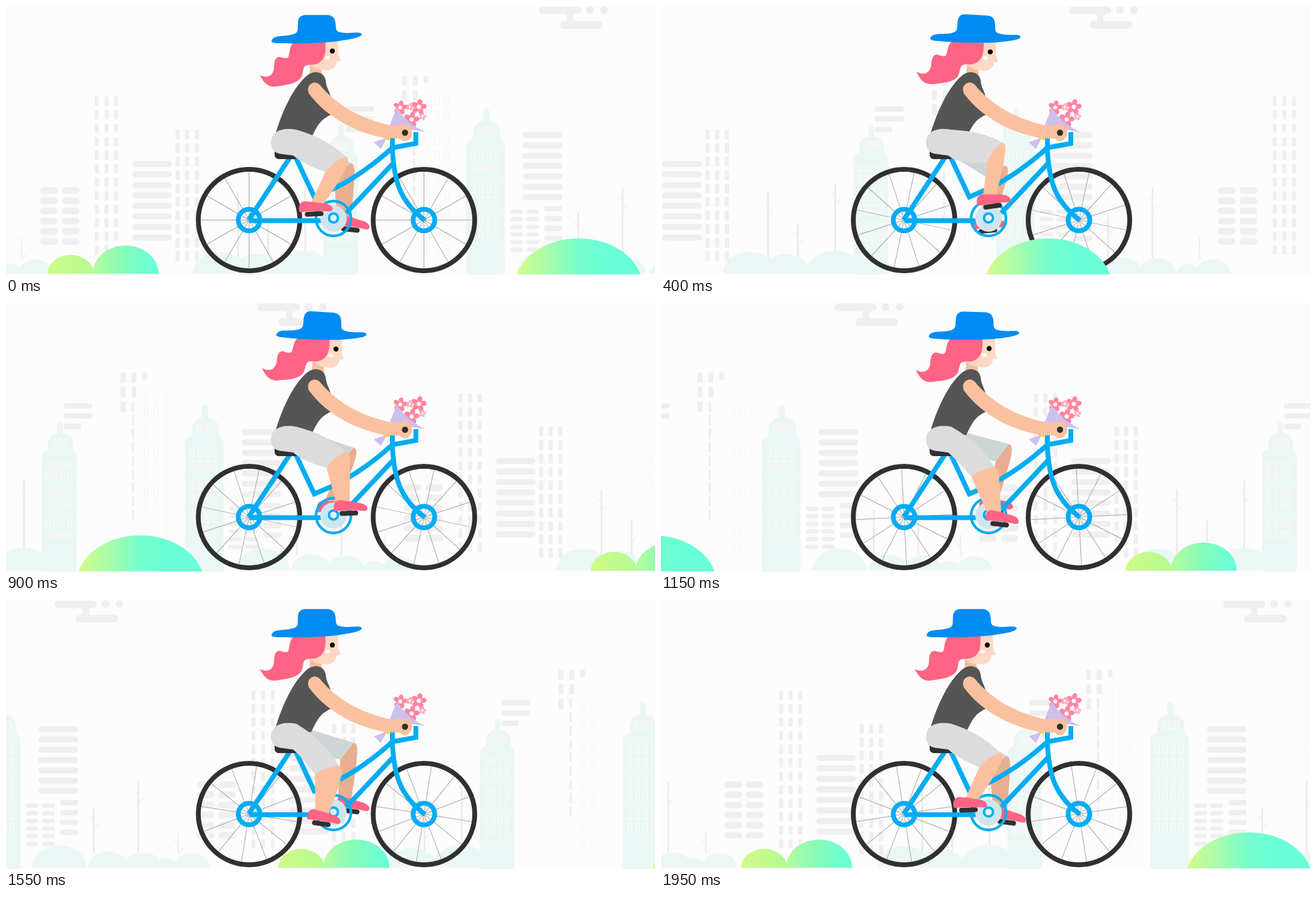
Write an HTML page with a canvas that moves like this. It is 1080x448 px and loops after 2 s.

```html
<!DOCTYPE html>
<html lang="en">
<head>
<meta charset="utf-8">
<title>Bicycle ride</title>
<style>
  html, body { margin: 0; width: 100%; height: 100%; overflow: hidden; background: #fcfcfc; }
  canvas { display: block; width: 1080px; height: 448px; }
</style>
</head>
<body>
<canvas id="stage" width="1080" height="448"></canvas>
<script>
const ctx = document.getElementById('stage').getContext('2d');
const STEP = 50, STEPS = 40, RAD = Math.PI / 180;
const BLUE = '#00acf3', DARK = '#303030', GREY = '#efefef', MINT = '#eaf7f4';
const SKIN = '#fac19e', PINK = '#ff6484', ROSE = '#ff85a1', LILAC = '#cdbfee';

function fill(path, color) {
  ctx.fillStyle = color;
  ctx.fill(new Path2D(path));
}
function stroke(path, color, width) {
  ctx.strokeStyle = color;
  ctx.lineWidth = width;
  ctx.stroke(new Path2D(path));
}
function oval(x, y, rx, ry, color) {
  ctx.fillStyle = color;
  ctx.beginPath();
  ctx.ellipse(x, y, rx, ry, 0, 0, 7);
  ctx.fill();
}
function ring(x, y, r, color, width) {
  ctx.strokeStyle = color;
  ctx.lineWidth = width;
  ctx.beginPath();
  ctx.arc(x, y, r, 0, 7);
  ctx.stroke();
}
function bar(x, y, w, h, r = 0, color = GREY) {
  ctx.fillStyle = color;
  ctx.beginPath();
  ctx.roundRect(x, y, w, h, r);
  ctx.fill();
}
function dome(left, width, height, base, color) {
  ctx.fillStyle = color;
  ctx.beginPath();
  ctx.ellipse(left + width / 2, base, width / 2, height, 0, Math.PI, 0);
  ctx.fill();
}
function placed(x, y, angle, scale, draw) {
  ctx.save();
  ctx.translate(x, y);
  ctx.rotate(angle);
  ctx.scale(scale, scale);
  draw();
  ctx.restore();
}

// Scenery
function grid(x, y, columns, gap, rows, pitch, w, h, r, color) {
  for (let c = 0; c < columns; c++)
    for (let i = 0; i < rows; i++) bar(x + c * gap, y + i * pitch, w, h, r, color);
}
function tower(x, scale) {
  placed(x, 447, 0, scale, () => {
    bar(28, -277, 10, 40, 5, MINT);
    bar(11, -256, 46, 60, [20, 20, 0, 0], MINT);
    bar(0, -225, 64, 225, [12, 12, 0, 0], MINT);
    const panes = (px, py, count, gap) => {
      grid(px, py, count, gap, 1, 0, 8, 15, 1, '#fcfcfc');
      grid(px + 1, py + 1, count, gap, 1, 0, 6, 13, 0, '#f2f5f4');
    };
    panes(19, -246, 3, 10.5);
    for (let i = 0; i < 3; i++) {
      panes(7.5, -205 + i * 54.5, 4, 13);
      panes(7.5, -184.5 + i * 54.5, 4, 13);
    }
  });
}
function tree(x, top) {
  const height = 420 - top;
  stroke(`M${x} ${top}V420`, '#ebebeb', height > 50 ? 3 : 1.5);
  stroke(`M${x} ${top + 38}l8 -10M${x} ${top + 22}l-6 -7`, GREY, 1.5);
  ctx.setLineDash([2, 9]);
  ring(x, top - 14, Math.min(36, height * .36), '#f4f4f4', 1.5);
  ctx.setLineDash([]);
}
function cloud(x) {
  bar(x, 1, 70, 12.5, 6);
  bar(x + 35, 25, 70, 13, 6);
  fill(`M${x + 42} 12h21q-7 2 -6 8q0 5 5 6h-19q5 -2 4 -7q0 -6 -5 -7Z`, GREY);
  oval(x + 84.5, 7, 6.5, 6.5, GREY);
  oval(x + 108, 7, 6.5, 6.5, GREY);
}
function city() {
  cloud(887);
  grid(148, 151, 3, 16, 12, 22.5, 6.5, 15);
  grid(282, 206, 3, 16, 10, 22.5, 7, 16);
  grid(210, 258, 1, 0, 8, 17.5, 66, 10, 5);
  grid(57, 302, 2, 36, 6, 16.9, 29, 11, 5);
  grid(564, 167, 1, 0, 2, 16.5, 48, 9, 4);
  bar(564, 201, 29, 9, 4);
  grid(659, 116, 2, 18, 2, 24, 8, 17);
  bar(659, 164, 8, 18);
  grid(677, 164, 1, 0, 9, 22.5, 4, 17);
  bar(695, 116, 8, 12);
  grid(698, 151, 3, 16, 12, 22.5, 7, 15, 0, '#f4f4f4');
  grid(699, 152, 3, 16, 12, 22.5, 5, 13, 0, '#fcfcfc');
  grid(860, 210, 1, 0, 7, 17.2, 66, 10, 5);
  grid(839, 339, 2, 27, 6, 12.7, 21, 7, 3);
  grid(896, 333, 1, 0, 4, 16.5, 30, 9, 4);
  tower(766, 1);
  tower(528, .9);
  for (const [x, top] of [[26, 385], [386, 310], [436, 362], [498, 295], [952, 345], [1026, 302]]) tree(x, top);
  for (const [x, width] of [[-12, 38], [20, 58], [311, 89], [376, 80], [450, 94], [850, 90], [943, 66], [1003, 62]])
    dome(x, width, width * .4, 445, MINT);
}
function gradient(left, width, ...colors) {
  const g = ctx.createLinearGradient(left, 0, left + width, 0);
  colors.forEach((c, i) => g.addColorStop(i / (colors.length - 1), c));
  return g;
}
function bigHill(x) {
  dome(x - 3, 212, 80, 467, gradient(x, 206, '#d4fb8b', '#a8fcaa', '#76fdcd', '#68ffd8', '#68ffd8'));
}
function smallHills(x) {
  dome(x, 77, 31.5, 446, gradient(x, 77, '#d0fb88', '#b4fa94'));
  dome(x + 75, 110, 47, 446, gradient(x + 75, 110, '#b6fb9c', '#82fcbc', '#66ffdc'));
}
function hills(k) {
  const shift = 38.57 * k + 8.83 * Math.max(0, k - 14);
  ctx.save();
  ctx.beginPath();
  ctx.rect(0, 0, 1080, 447);
  ctx.clip();
  bigHill(850 - shift);
  smallHills(69 - shift);
  smallHills(1693 - 40 * k);
  bigHill(1850 - 25 * k);
  ctx.restore();
}

// Legs: each pedal runs round an ellipse, the knee follows from the bone lengths
const near = {
  hip: [480, 228], thigh: 77, shin: 75, cuff: 21, skin: SKIN, cloth: '#dcdcdc',
  orbit: [541, 354, 30, 22], turns: [[0, 200], [8, 291], [18, 350], [31, 483], [40, 560]],
  tilt: turn => 9 * Math.sin(turn),
  shorts: (tx, ty, bx, by) => `M441 230C440 208 460 202 483 206
    Q${(483 + tx) / 2 + 10} ${(206 + ty) / 2 - 8} ${tx} ${ty}
    Q${(tx + bx) / 2 - 5} ${(ty + by) / 2 - 4} ${bx} ${by}Q495 264 478 249L455 246Q442 243 441 230Z`
};
const far = {
  hip: [488, 232], thigh: 82, shin: 85, cuff: 18, skin: '#e7af8f', cloth: '#ced6d5',
  orbit: [557, 362, 22, 15], turns: [[0, 43], [8, 126], [18, 231], [31, 316], [40, 403]],
  tilt: turn => 9 * Math.cos(turn),
  shorts: (tx, ty, bx, by) => `M490 211L${tx} ${ty}L${bx} ${by}L484 250Z`
};

function between(keys, k) {
  const i = keys.findIndex(([time]) => time > k);
  const [t0, a] = keys[i - 1], [t1, b] = keys[i];
  return a + (b - a) * (k - t0) / (t1 - t0);
}
function leg({ hip, thigh, shin, cuff, skin, cloth, orbit, turns, tilt, shorts }, k) {
  const turn = between(turns, k) * RAD;
  const px = orbit[0] + orbit[2] * Math.cos(turn), py = orbit[1] + orbit[3] * Math.sin(turn);
  const ankleX = px + 4 - (px - 512) * .23, ankleY = py - 15;

  const dx = ankleX - hip[0], dy = ankleY - hip[1], reach = Math.hypot(dx, dy);
  const bend = Math.acos(Math.min(1, (thigh ** 2 + reach ** 2 - shin ** 2) / (2 * thigh * reach)));
  const angle = Math.atan2(dy, dx) - bend, slant = angle - 65 * RAD;
  const kx = hip[0] + thigh * Math.cos(angle), ky = hip[1] + thigh * Math.sin(angle);
  const cx = cuff * Math.cos(slant), cy = cuff * Math.sin(slant);
  const hem = [kx + cx, ky + cy, kx - cx, ky - cy];

  placed(px, py, tilt(turn) * RAD, 1, () => bar(-15.5, -4, 31, 8, 4, DARK));
  fill(`M${kx - 10} ${ky - 6}L${hem[0]} ${hem[1]}C${hem[0] + 9} ${hem[1] + 2} ${hem[0] + 7} ${hem[1] + 18}
    ${ankleX + 11} ${ankleY}H${ankleX - 11}L${hem[2]} ${hem[3]}Z`, skin);
  placed(px, py, tilt(turn) * RAD, 1, () => fill(
    'M-24 -4C-27 -14 -22 -23 -14 -22L2 -20C12 -17 24 -18 30 -11Q34 -4 26 -3Q5 -6 -24 -4Z', PINK));
  fill(shorts(...hem), cloth);
}

// Bicycle
function wheel(x, k) {
  placed(x, 356.5, k / STEPS * 2 * Math.PI, 1, () => {
    for (let i = 0; i < 6; i++) {
      ctx.rotate(30 * RAD);
      stroke('M-80 0H80', '#a0a0a0', 1);
    }
  });
  ring(x, 356.5, 84.5, DARK, 8);
  ring(x, 356.5, 18, BLUE, 8);
}
function bikeFrame() {
  stroke('M404 356L474 250M482 252L513 318L548 303Q598 277 643 236M566 345L646 260', BLUE, 8);
  stroke('M643 218V240C646 290 654 324 697 357M643 236L682 229V210M405 357.5H524', BLUE, 8);
  oval(545, 354, 22, 22, '#cfe5ee');
  ring(545, 354, 29, BLUE, 4.5);
  oval(545, 353, 7, 7, '#e4f1f6');
  ring(545, 353, 7.5, BLUE, 4);
  bar(447, 232, 41, 23, 7, DARK);
}

// Rider
function head(k) {
  const nod = Math.max(0, 1 - Math.abs(k - 14) / 14) * .1;
  ctx.save();
  ctx.translate(522, 162);
  ctx.rotate(nod);
  ctx.translate(-522, -162);
  fill('M506 94L505 116H526L524 98Z', '#f6bd9c');
  fill('M508 58H552L553 81L557 90Q555 93 550 92C550 102 543 108 530 107C517 106 508 102 506 96Z', '#ffd8c5');
  oval(543, 75, 4.2, 4.2, '#000');
  oval(535, 86, 4.2, 3, '#fff');
  fill(`M478 62L531 59C534 82 528 99 505 98C493 99 496 104 493 115
    C488 129 470 131 450 134C434 136 429 126 422 115C435 121 444 117 446 104
    C446 88 450 82 460 86C470 88 470 86 471 80C473 69 474 65 478 62Z`, PINK);
  fill(`M442 58C446 47 462 52 478 47C488 44 485 38 486 25Q488 15 498 15H536Q546 16 548 26
    C550 37 547 42 557 44C574 47 590 41 592 47C592 53 568 56 550 59C520 62 480 63 455 62Q441 62 442 58Z`, '#008cf2');
  ctx.restore();
}
function flower(x, y, size, color) {
  placed(x, y, .2, size / 11, () => {
    for (let i = 0; i < 5; i++) {
      ctx.rotate(72 * RAD);
      oval(0, -7, 3.9, 5, color);
    }
    oval(0, 0, 3.2, 3.2, '#fff');
  });
}
function bouquet() {
  flower(656, 169, 11, ROSE);
  flower(675, 189, 12, ROSE);
  flower(687, 168, 12, ROSE);
  flower(672, 168, 6, '#ffadc0');
  flower(693, 184, 6, '#ffadc0');
  fill('M650 170Q668 196 698 210L638 200Z', LILAC);
  fill('M612 227L634 219L624 238Z', LILAC);
  fill('M628 216L640 217L637 224L626 219Z', '#ffd42e');
}
function torso() {
  fill(`M449 211C461 172 479 134 502 115C514 106 530 110 532 124C533 138 540 143 540 153L541 181
    C526 188 520 194 508 220L449 214Z`, '#555');
}
function arm() {
  fill(`M505 147C497 134 511 121 522 131C550 165 590 188 641 199L666 197C676 200 679 212 673 219
    C668 227 660 227 656 221L632 220C585 212 535 187 505 147Z`, SKIN);
  oval(664, 211, 5.2, 5.2, DARK);
}

function draw(now) {
  const k = Math.floor(now / STEP) % STEPS;
  ctx.fillStyle = '#fcfcfc';
  ctx.fillRect(0, 0, 1080, 448);
  for (const x of [-26 * k, 1082 - 26.5 * k]) placed(x, 0, 0, 1, city);
  wheel(404.5, k);
  wheel(695.5, k);
  leg(far, k);
  bikeFrame();
  head(k);
  torso();
  leg(near, k);
  bouquet();
  arm();
  hills(k);
  requestAnimationFrame(draw);
}
requestAnimationFrame(draw);
</script>
</body>
</html>
```
